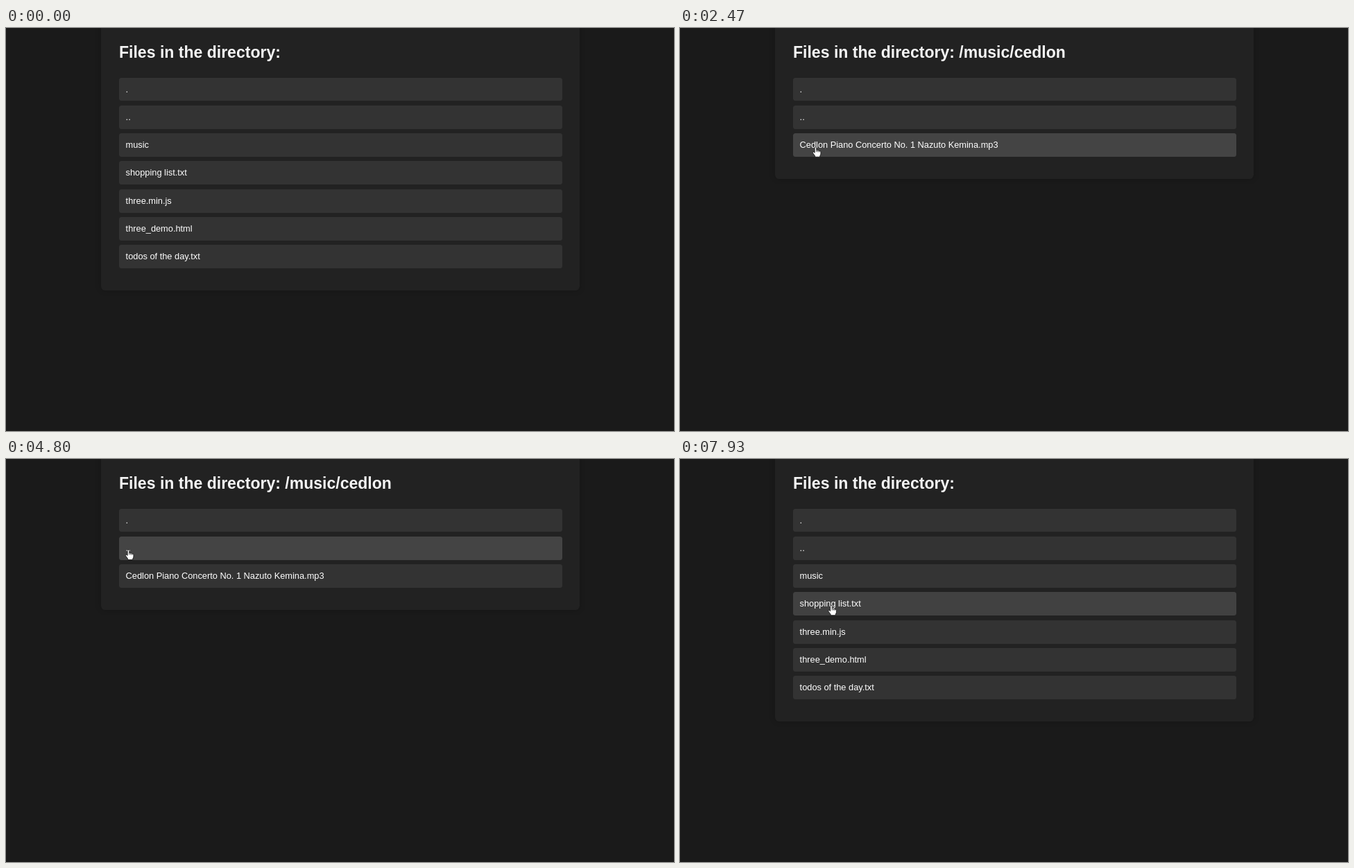
Write an HTML page that moves like this. It is 963 px wide and 582 px high and loops after 8 s.

```html
<!DOCTYPE html>
<html lang="en">
<head>
<meta charset="utf-8">
<title>File browser</title>
<style>
  html, body { margin: 0; width: 100%; height: 100%; overflow: hidden; background: #1a1a1a; }
  #stage { position: relative; width: 963px; height: 582px; overflow: hidden;
    font-family: "Liberation Sans", Arial, sans-serif; }
  #panel { position: absolute; left: 137.4px; top: -20px; width: 690px; background: #222;
    border-radius: 6.4px; box-shadow: 0 0 8px rgba(0, 0, 0, .2); }
  h1 { position: absolute; left: 163px; top: 22px; margin: 0; white-space: pre;
    font-size: 23.04px; line-height: 26px; color: #f5f5f5; }
  .row { position: absolute; left: 163px; width: 629.2px; height: 33.9px; padding-left: 9.6px;
    border-radius: 3.5px; font-size: 12.8px; line-height: 33.9px; color: #fff; white-space: pre; }
  svg { position: absolute; left: 0; top: 0; }
  #player text { font: 11.2px Roboto, sans-serif; fill: #323639; }
</style>
</head>
<body>
<div id="stage">
  <div id="browser">
    <div id="panel"></div>
    <h1 id="heading"></h1>
    <div id="rows"></div>
  </div>
  <svg id="player" width="963" height="582">
    <rect width="963" height="582" fill="#000"/>
    <rect x="363" y="310.2" width="239.6" height="43.2" rx="21.6" fill="#f1f3f4"/>
    <path d="M379.6 327h2.8v9.2h-2.8zM384.7 327h2.8v9.2h-2.8z"/>
    <text x="400.6" y="335.2">0:00 / 41:42</text>
    <rect x="472" y="330" width="59" height="3.2" rx="1.6" fill="#c4c5c6"/>
    <rect x="472" y="330" width="5.6" height="3.2" rx="1.6"/>
    <path d="M550.2 329.4v4.4h2.8l3.6 3.6v-11.6l-3.6 3.6z"/>
    <path d="M557.6 328.6a3.4 3.4 0 0 1 0 6z"/>
    <path d="M557.8 326.4a5.4 5.4 0 0 1 0 10.4" fill="none" stroke="#000" stroke-width="1.3"/>
    <circle cx="581.8" cy="327.3" r="1.4"/>
    <circle cx="581.8" cy="331.6" r="1.4"/>
    <circle cx="581.8" cy="335.9" r="1.4"/>
  </svg>
  <svg id="pointer" width="24" height="24" overflow="visible" fill="#fff" stroke="#000" stroke-width=".7" stroke-linejoin="round">
    <path id="arrow" d="M0 0V11.4L2.6 9L4.4 13L6.3 12.2L4.6 8.3H8.2Z"/>
    <g id="hand">
      <path d="M-1.3 .9Q-1.2 -.2 0 -.2Q1.2 -.2 1.2 .9V4.6Q2.2 3.9 3.2 5Q4.4 4.4 5.2 5.5Q7.4 5.2 7.4 7V9.8Q7.2 11.6 6.2 12.6V14.2H-.8V12.8L-4 8.4Q-4.5 7.1 -3.3 6.9Q-2.3 6.9 -1.3 8.2Z"/>
      <path d="M1.2 4.8V7M3.2 5.2V7.2M5.2 5.7V7.4" fill="none"/>
    </g>
  </svg>
</div>
<script>
const LOOP = 8000;
const ROW = { left: 163, right: 802, top: 71.5, pitch: 40.3, height: 33.9 };
const HOVER_FADE = 200;

const ROOT = { path: "", files: ["music", "shopping list.txt", "three.min.js", "three_demo.html", "todos of the day.txt"] };
const MUSIC = { path: " /music", files: ["cedlon", "mendir"] };
const CEDLON = { path: " /music/cedlon", files: ["Cedlon Piano Concerto No. 1 Nazuto Kemina.mp3"] };
const MENDIR = { path: " /music/mendir", files: ["Zong Jeng Mendir Concerto Piano Orchestra No 24.mp3"] };
const PLAYER = { files: [] };

// Each visit: start time in ms and the page shown from then on.
const visits = [
  [0, ROOT], [1000, MUSIC], [1740, CEDLON], [2540, PLAYER], [3680, CEDLON],
  [4940, MUSIC], [5400, MENDIR], [7060, MUSIC], [7400, ROOT],
];

// Pointer stops: time in ms, x, y.
const stops = [
  [0, 830, 602], [70, 803, 584], [870, 196, 166], [930, 196, 173], [2270, 196, 173],
  [2330, 195.5, 172], [2680, 195.5, 172], [3090, 28, -20], [3680, 30, -18],
  [4270, 175, 126], [4410, 175, 126], [4800, 176.5, 131.3], [4990, 176.5, 131.3],
  [5200, 191, 208], [5460, 191, 208], [6060, 188, 170], [6500, 92, 10],
  [6860, 176.5, 135.5], [7460, 176.5, 135.5], [7930, 218, 211.5], [8000, 218, 211.5],
];

const $ = id => document.getElementById(id);
const visitAt = t => visits.findLast(v => v[0] <= t);

function pointerAt(t) {
  const i = stops.findIndex(s => s[0] > t);
  const [t0, x0, y0] = stops[i - 1], [t1, x1, y1] = stops[i];
  const u = (t - t0) / (t1 - t0), k = u * u * (3 - 2 * u);
  return [x0 + (x1 - x0) * k, y0 + (y1 - y0) * k];
}

function rowAt([x, y]) {
  const i = Math.floor((y - ROW.top) / ROW.pitch);
  const inside = y - ROW.top - i * ROW.pitch <= ROW.height;
  return inside && x >= ROW.left && x <= ROW.right ? i : -1;
}

// Averaging recent hovering gives a linear fade.
function hoverLevel(row, t) {
  const samples = 20;
  let hits = 0;
  for (let k = 0; k < samples; k++) {
    if (rowAt(pointerAt(Math.max(0, t - k * HOVER_FADE / samples))) === row) hits++;
  }
  return hits / samples;
}

let shown;
function showPage(page) {
  if (page === shown) return;
  shown = page;
  $("player").style.display = page === PLAYER ? "" : "none";
  const names = [".", "..", ...page.files];
  $("heading").textContent = "Files in the directory:" + (page.path || "");
  $("panel").style.height = 20 + ROW.top + (names.length - 1) * ROW.pitch + ROW.height + 32 + "px";
  $("rows").replaceChildren(...names.map((name, i) => {
    const row = document.createElement("div");
    row.className = "row";
    row.textContent = name;
    row.style.top = ROW.top + i * ROW.pitch + "px";
    return row;
  }));
}

function draw(t) {
  const [since, page] = visitAt(t);
  showPage(page);
  [...$("rows").children].forEach((row, i) => {
    const grey = Math.round(51 + 17 * hoverLevel(i, t));
    row.style.background = `rgb(${grey}, ${grey}, ${grey})`;
  });

  const [x, y] = pointerAt(t), [x0, y0] = pointerAt(since);
  const row = rowAt([x, y]);
  // A fresh page keeps the arrow until the pointer moves.
  const isHand = page !== PLAYER && row >= 0 && row < page.files.length + 2 && (x !== x0 || y !== y0);
  $("hand").style.display = isHand ? "" : "none";
  $("arrow").style.display = isHand ? "none" : "";
  $("pointer").style.transform = `translate(${x}px, ${y}px)`;
}

const start = performance.now();
function tick() {
  draw((performance.now() - start) % LOOP);
  requestAnimationFrame(tick);
}
tick();
</script>
</body>
</html>
```
